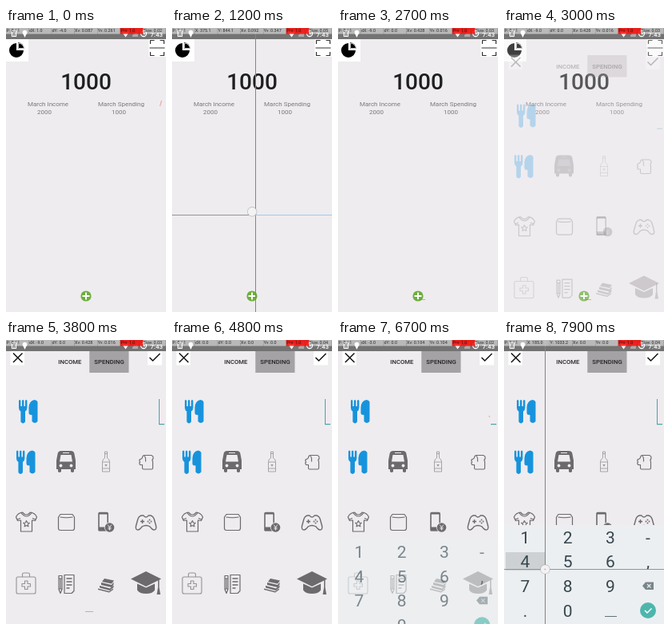
Animation, 200 px wide and 356 px high, one loop 8000 ms. Source, as an HTML page with a canvas:

```html
<!DOCTYPE html>
<html lang="en">
<head>
<meta charset="utf-8">
<title>Budget app</title>
<style>
html, body { margin: 0; width: 100%; height: 100%; overflow: hidden; background: #eeecef; }
canvas { display: block; width: 200px; height: 356px; }
</style>
</head>
<body>
<canvas id="stage"></canvas>
<script>
const W = 200, H = 356, LOOP = 8000, STEP = 100;
const BG = '#eeecef', GREY = '#6c6a6c', LIGHT = '#949294', BLUE = '#1793dd', TEAL = '#4db6ac';
const canvas = document.getElementById('stage');
const ctx = canvas.getContext('2d');
const dpr = window.devicePixelRatio || 1;
canvas.width = W * dpr;
canvas.height = H * dpr;

// Touches: path from (x, y) to (x2, y2); the release leaves a short trail.
const touches = [
  { start: -600, end: -300, x: 193, y: 95, x2: 193, y2: 95, dx: 1, dy: -4, xv: .087, yv: .261, size: .02, trail: [194.5, 91, 192.5, 98] },
  { start: 300, end: 500, x: 102, y: 215, x2: 102, y2: 217, dx: 0, dy: 6, xv: .021, yv: .064, size: .04 },
  { start: 1200, end: 1700, x: 104.2, y: 234.8, x2: 107, y2: 262, dx: 10, dy: 98, xv: .092, yv: .347, size: .05, lag: [-4, -4.5], ray: true },
  { start: 2300, end: 2700, x: 104, y: 340, x2: 102, y2: 340, dx: -9, dy: 0, xv: .428, yv: .016, size: .03, trail: [99, 340.5, 109, 340.5] },
  { start: 4300, end: 4500, x: 25, y: 152, x2: 25, y2: 152, dx: 0, dy: 0, xv: 0, yv: 0, size: .04 },
  { start: 6300, end: 6500, x: 190, y: 97, x2: 189, y2: 96, dx: -3, dy: 0, xv: .104, yv: .104, size: .02, trail: [188.5, 95, 190, 97] },
  { start: 7800, end: 8100, x: 51.4, y: 287.4, x2: 51.4, y2: 287.4, dx: 0, dy: 0, xv: 0, yv: 0, size: .04 }
];

const clamp = v => Math.max(0, Math.min(1, v));
const easeOut = p => 1 - (1 - p) ** 2;

function rect(x, y, w, h, color) {
  ctx.fillStyle = color;
  ctx.fillRect(x, y, w, h);
}

function disc(x, y, r, color) {
  ctx.fillStyle = color;
  ctx.beginPath();
  ctx.arc(x, y, r, 0, Math.PI * 2);
  ctx.fill();
}

function text(str, x, y, size, color, align = 'left', weight = 400) {
  ctx.font = `${weight} ${size}px Roboto, sans-serif`;
  ctx.textAlign = align;
  ctx.fillStyle = color;
  ctx.fillText(str, x, y);
}

function fill(d, color = GREY) {
  ctx.fillStyle = color;
  ctx.fill(new Path2D(d));
}

function stroke(d, color = GREY, width = 1) {
  ctx.strokeStyle = color;
  ctx.lineWidth = width;
  ctx.stroke(new Path2D(d));
}

function at(x, y, draw) {
  ctx.save();
  ctx.translate(x, y);
  draw();
  ctx.restore();
}

function cutlery() {
  fill('M0 1q1.200-2 2.400 0v7h1.600v-7q1.200-2 2.400 0v7h1.600v-7q1.200-2 2.400 0v9q0 3-2.400 4.500v13q-2.800 4-5.600 0v-13q-2.400-1.500-2.400-4.500z', BLUE);
  fill('M23.500 2.500q-1-2.500-4-2.500-6.500 1-7 9.500v7q0 2.500 4 2.500v8q3.500 4 7 0z', BLUE);
}

function bus() {
  fill('M6 0h12q4 0 4.500 4l1.500 8v11h-2v3q-2 2-4 0v-3h-12v3q-2 2-4 0v-3h-2v-11l1.500-8q.5-4 4.500-4z');
  fill('M5.500 5h13l1.500 8.500h-16zM8 2h8v1h-8z', BG);
  disc(5.500, 18.500, 1.900, BG);
  disc(18.500, 18.500, 1.900, BG);
}

function bottle() {
  stroke('M3.500 0h3v8q3 1.500 3 4.500v12.500h-9v-12.500q0-3 3-4.500zM3.500 2.500h3M.5 13h9M.5 21h9', LIGHT, .8);
  fill('M3.300 16h3.400l-1.700 2.800z', LIGHT);
}

function paper() {
  stroke('M4 3q0-3 3-3h8q3 1 2.500 4-2 2-.5 4v8q0 1.500-1.500 1.500h-10q-1.500 0-1.500-1.500v-4h-3q-1.500-2 0-3.500-1.500-2 0-3.500 2 0 3-2zM5 0q3 1 3 5v3', GREY, 1.100);
}

function shirt() {
  stroke('M8 0q5 6 10 0 6 1 8 6l-2 4.500-4-.5v14h-14v-14l-4 .5-2-4.500q2-5 8-6zM6 0q7 10 14 0M1.500 9l4-1.500M24.500 9l-4-1.500', GREY, 1.200);
  stroke('M13 10.500l1.200 2.500 2.600.3-2 1.800.6 2.700-2.400-1.400-2.400 1.400.6-2.700-2-1.800 2.600-.3z', GREY, 1.100);
}

function bag() {
  stroke('M2.500 0h15l2.500 3.500v14q0 2.500-2.500 2.500h-15q-2.500 0-2.500-2.500v-14zM2 3.500q8 1.500 16 0', GREY, 1.200);
}

function phone() {
  stroke('M2 1h9q1.200 0 1.200 1.200v20.800h-11.200v-20.800q0-1.200 1-1.200z', GREY, 1.600);
  rect(1, 19, 11, 5, GREY);
  rect(1, .5, 11, 2.500, GREY);
  disc(14.500, 19.500, 6.500, BG);
  disc(14.500, 19.500, 5.800, GREY);
  stroke('M12 16l2.500 3 2.500-3M14.500 19v4M12.500 19.500h4M12.500 21.300h4', BG, .9);
}

function gamepad() {
  stroke('M6 0h3q1 2 3 2t3-2h3q3 1 4 4l2.500 9q1 5-2.500 5-2 0-5-4-5-3-10 0-3 4-5 4-3.500 0-2.500-5l2.500-9q1-3 4-4z', GREY, 1.400);
  stroke('M5 7.500h5M7.500 5v5', GREY, 1.400);
  for (const [x, y] of [[16.500, 5.500], [16.500, 9.500], [14.500, 7.500], [18.500, 7.500]]) disc(x, y, .9, GREY);
}

function medkit() {
  stroke('M2 5h20q2 0 2 2v17q0 2-2 2h-20q-2 0-2-2v-17q0-2 2-2zM7.500 5v-3q0-2 2-2h5q2 0 2 2v3', LIGHT, 1.100);
  stroke('M10.500 10h3.500v3.500h3.500v3.500h-3.500v3.500h-3.500v-3.500h-3.500v-3.500h3.500z', LIGHT, 1.100);
}

function notes() {
  stroke('M1 1.500h4v17l-2 5-2-5zM1 5h4M1 18h4M3 5v13', GREY, 1.200);
  stroke('M8 .5h12v20l-3 3h-9z', GREY, 1.200);
  stroke('M10.500 5h7M10.500 9h7M10.500 13h7M10.500 17h4', GREY, 1.300);
}

function books() {
  fill('M8 0l12 2.500-3 4-12-2.500z');
  fill('M4 5l13 3 2.500-3.500v3l-2.500 3.500-13-3z');
  fill('M2 9l13 3.500 4.500-4v2.500l-4.500 4-13-3.500z');
  fill('M0 12.500l14 3.500 5-3.500v1.500l-5 3.500-14-3.500z');
}

function cap() {
  fill('M19 0l19 9.500-19 9.500-19-9.500z');
  fill('M8 15.500l11 5 11-5v8q-3 4.500-11 4.500t-11-4.500z');
  fill('M34 10h1.500v10l1.500 9h-4.500l1.500-9z');
}

function home() {
  rect(0, 0, W, H, BG);
  rect(0, 14, 28, 28, '#fff');
  fill('M13 28v-9a9 9 0 1 0 9 9z', '#000');
  fill('M15 26v-8a8.500 8.500 0 0 1 8 8z', '#000');
  stroke('M15.500 25.500v-6.500a7 7 0 0 1 7 6.500z', '#fff', .8);
  rect(178.500, 14, 21.500, 22, '#fff');
  stroke('M180.500 20v-4.500h5M192.500 15.500h5v4.500M180.500 30v4.500h5M192.500 34.500h5v-4.500M179.500 25h19', '#333', 1.200);
  text('1000', 100, 76.500, 28, '#1f1f21', 'center', 500);
  text('March Income', 52.500, 97.500, 8, '#777', 'center');
  text('2000', 48, 108, 8, '#777', 'center');
  text('March Spending', 144, 97.500, 8, '#777', 'center');
  text('1000', 141, 108, 8, '#777', 'center');
  disc(100, 336, 6.600, '#6fae3e');
  stroke('M95.500 336h9M100 331.500v9', '#fff', 1.900);
}

const grid = [
  [13, 138.500, cutlery], [63, 139, bus], [120, 140, bottle], [166.500, 144.500, paper],
  [12.500, 216, shirt], [65.500, 218.500, bag], [115, 215.500, phone], [163, 220, gamepad],
  [13, 292, medkit], [65, 294, notes], [115, 299, books], [156, 290, cap]
];

function spending(cursor) {
  rect(0, -30, W, H + 60, BG);
  rect(5.500, 13, 17.500, 18.500, '#fff');
  stroke('M9 16.500l11.500 11.500M20.500 16.500l-11.500 11.500', '#111', 1.500);
  rect(177, 14, 18, 17.500, '#fff');
  stroke('M179.500 22l4 4 9-9', '#111', 1.500);
  rect(104.300, 13.500, 49.200, 27.500, '#a4a2a4');
  text('INCOME', 79.800, 30.200, 7.700, '#222', 'center', 500);
  text('SPENDING', 129, 30.200, 7.700, '#222', 'center', 500);
  at(16, 75, cutlery);
  for (const [x, y, draw] of grid) at(x, y, draw);
  rect(191, 105, 7, 1.200, '#4aa3a8');
  if (cursor) rect(191, 74, 1, 31, '#4aa3a8');
}

function keyboard(pressed) {
  rect(0, 232, W, 124, '#eceff1');
  if (pressed) rect(2, 266, 50, 23, '#cdd1d3');
  ['123-', '456,', '789', '.0'].forEach((row, r) => {
    [...row].forEach((key, c) => {
      text(key, [26.500, 79.700, 133, 180][c], 254.600 + r * 30.700, 21, '#37474f', 'center');
    });
  });
  rect(126, 346, 15, 1, '#62727a');
  fill('M177 303.500h10v9.500h-10l-4-4.750z', '#78868c');
  stroke('M179 306l4.500 4.500M183.500 306l-4.500 4.500', '#eceff1', 1.100);
  disc(180, 339, 10, TEAL);
  stroke('M176 339l3 3 5.500-5.500', '#fff', 1.500);
}

function statusBar() {
  rect(0, 0, W, 14, '#747374');
  stroke('M7.500 3.500h5v7h-5zM9 9h2', '#fff', 1.200);
  disc(23.500, 5.500, 2.800, '#fff');
  fill('M21 6.500h5l-2.500 5.500z', '#fff');
  fill('M145 5q4.500-3 9 0l-4.500 6.500z', '#fff');
  fill('M158 11v-2l7-7v9z', '#a9a9a9');
  ctx.strokeStyle = '#fff';
  ctx.lineWidth = 1.300;
  ctx.beginPath();
  ctx.arc(172, 7, 3.500, 0, 7);
  ctx.stroke();
  stroke('M172 4.500v3h2', '#fff', .9);
  text('7:43', 196, 10.500, 8, '#fff', 'right', 500);
}

function readout(touch, down, pos) {
  const col = W / 7;
  const speed = v => v ? v.toFixed(3) : '0.0';
  const labels = [
    `P: ${down ? 1 : 0} / 1`,
    down ? `X: ${(pos.x * 3.6).toFixed(1)}` : `dX: ${touch.dx.toFixed(1)}`,
    down ? `Y: ${(pos.y * 3.595).toFixed(1)}` : `dY: ${touch.dy.toFixed(1)}`,
    `Xv: ${speed(touch.xv)}`,
    `Yv: ${speed(touch.yv)}`,
    'Prs: 1.0',
    `Size: ${touch.size.toFixed(2)}`
  ];
  labels.forEach((label, i) => {
    rect(i * col, 0, col - .3, 7.500, i === 5 ? 'rgba(250,20,15,.88)' : 'rgba(255,255,255,.5)');
    text(label, i * col + .4, 5.400, 5.400, 'rgba(20,20,20,.85)');
  });
}

function pointer(t) {
  const touch = touches.filter(p => p.start <= t).pop();
  const down = t < touch.end;
  const p = clamp((t - touch.start) / (touch.end - touch.start));
  const pos = { x: touch.x + (touch.x2 - touch.x) * p, y: touch.y + (touch.y2 - touch.y) * p };
  if (down) {
    const [lx, ly] = touch.lag || [0, 0];
    const x = Math.floor(pos.x), y = Math.floor(pos.y);
    rect(x, 0, 1, H, '#858487');
    rect(0, y, W, 1, '#959497');
    if (touch.ray) rect(x, y, W - x, 1, '#a3c9ec');
    disc(pos.x + lx, pos.y + ly, 6.200, 'rgba(165,165,170,.7)');
    disc(pos.x + lx, pos.y + ly, 5.500, 'rgba(245,245,247,.95)');
    disc(pos.x, pos.y, .9, '#e79a94');
  } else if (touch.trail) {
    const [x1, y1, x2, y2] = touch.trail;
    stroke(`M${x1} ${y1}L${x2} ${y2}`, 'rgba(230,85,65,.65)', .8);
  }
  readout(touch, down, pos);
}

function cursorOn(t) {
  const base = t < 6900 ? 3800 : 6900;
  return t >= base && Math.floor((t - base) / 500) % 2 === 0;
}

function draw(t) {
  ctx.setTransform(dpr, 0, 0, dpr, 0, 0);
  ctx.lineJoin = 'round';
  if (t < 3300) home();
  if (t >= 3000) {
    const p = easeOut(clamp((t - 2950) / 350));
    ctx.save();
    ctx.globalAlpha = p;
    ctx.translate(0, 28 * (1 - p));
    spending(cursorOn(t));
    ctx.restore();
  }
  if (t >= 6600) {
    const p = clamp((t - 6500) / 320);
    ctx.save();
    ctx.globalAlpha = p;
    ctx.translate(0, t >= 6900 ? 0 : 30 * (1 - p ** 2));
    keyboard(t >= 7800);
    ctx.restore();
  }
  statusBar();
  pointer(t);
}

function tick() {
  const t = performance.now() % LOOP;
  draw(Math.floor(t / STEP) * STEP);
  requestAnimationFrame(tick);
}
tick();
</script>
</body>
</html>
```
